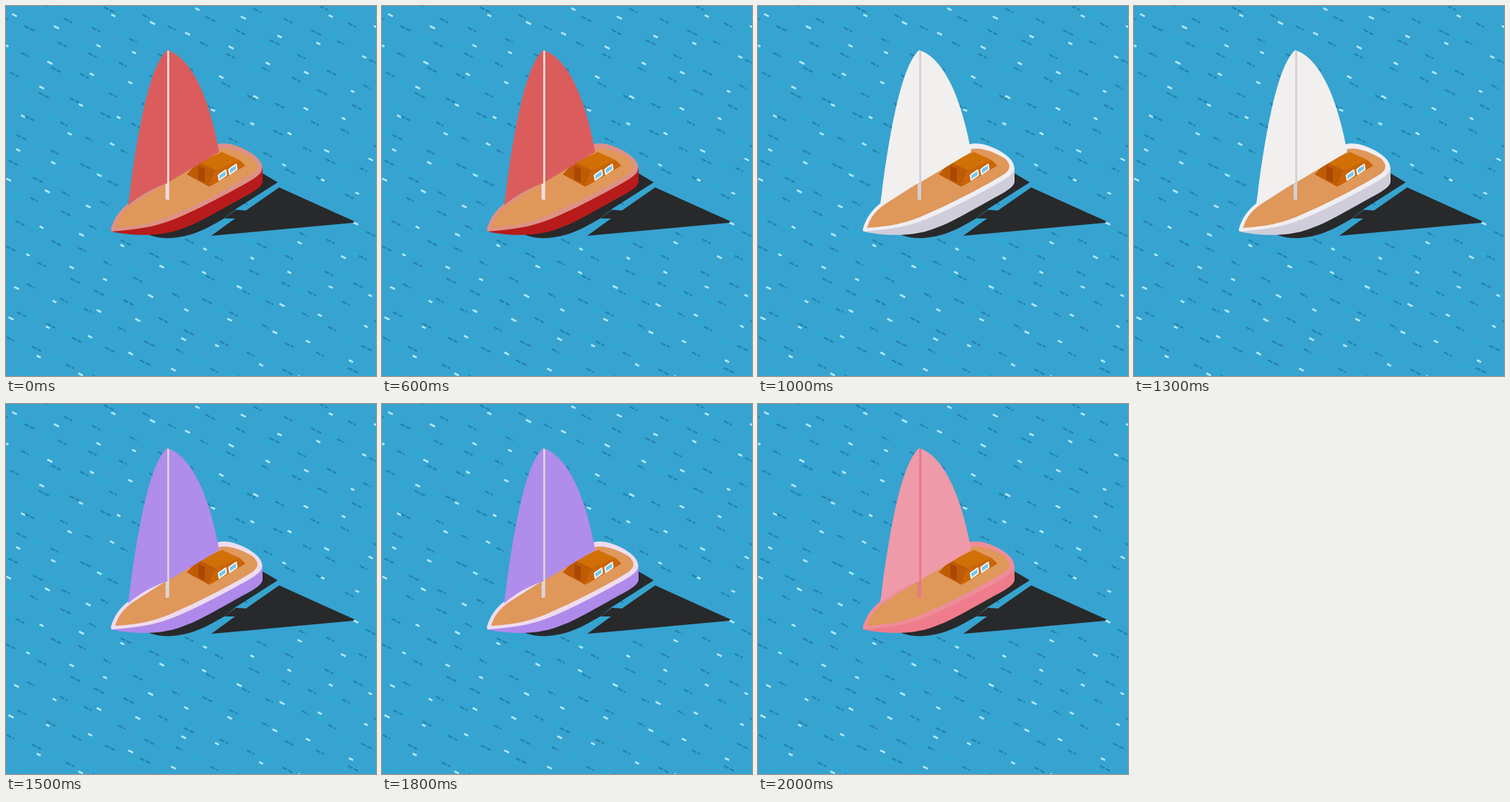
An HTML page for the animation above (2500 ms loop, 512 px wide and 512 px high).

```html
<!DOCTYPE html>
<html lang="en">
<head>
<meta charset="utf-8">
<title>Sailing boat</title>
<style>
  html, body { margin: 0; width: 100%; height: 100%; overflow: hidden; background: #37a3d0; }
  svg { display: block; width: 100%; height: 100%; }
  #waves path { fill: none; }
  #sail { fill: var(--sail); }
  #hull { fill: var(--hull); }
  #rim { fill: var(--rim); }
  .mast { stroke: var(--mast); fill: none; }
</style>
</head>
<body>
<svg id="scene" viewBox="0 0 512 512">
  <rect width="512" height="512" fill="#37a3d0"/>
  <g id="waves"></g>

  <g fill="#28292b">
    <path d="M354 231L376 244L318 281L302 294L284 304C255 320 225 326 198 317Z"/>
    <path d="M284 318L317 294L302 294L318 282L332 283L378 251L482 298L480 300Z"/>
  </g>

  <path id="hull" d="M145 308L146 312C170 318 210 319 235 311C262 303 282 290 310 275C330 263 355 253 355 243L355 223L240 285Z"/>
  <path id="rim" d="M145 309C149 294 158 281 171 272L291 192C305 187 325 194 340 204C352 212 356 220 354 227C352 235 338 242 320 252C298 264 270 279 240 292C205 307 180 309 146 312Z"/>
  <path id="deck" fill="#df975a" d="M151 307C155 293 163 283 176 274L295 198C310 195 328 203 340 210C350 217 351 226 340 233C320 246 270 272 240 285C205 302 180 305 151 307Z"/>

  <path fill="#d17005" d="M265 217L299 202L323 213L331 221L284 249L282 240Z"/>
  <path fill="#bf5b05" d="M250 233L266 216L290 227L281 250Z"/>
  <path fill="#c96508" d="M290 227L323 213L331 221L281 250Z"/>
  <path fill="#ab4706" d="M266 221L275 225L275 244L266 240Z"/>
  <g fill="#72c5e6" stroke="#f0f3f5" stroke-width="2" stroke-linejoin="round">
    <path id="window" d="M294 234L304 227L305 234L295 241Z"/>
    <use href="#window" x="14.5" y="-8"/>
  </g>

  <path id="sail" d="M223 61C196 85 180 190 169 276Q190 257 223 245Q258 224 295 202C282 130 258 72 223 61Z"/>
  <path class="mast" d="M224.5 62V247" stroke-width="2.8"/>
  <path class="mast" d="M223.3 246V268" stroke-width="5"/>
</svg>
<script>
const LOOP = 2500;
const PAINTS = [
  { until: 1000, sail: "#db5c5c", mast: "#f2dcdc", rim: "#dd9187", hull: "#b71b1b" },
  { until: 1500, sail: "#f1f0ef", mast: "#d2d0d2", rim: "#f0eef2", hull: "#d0cddb" },
  { until: 2000, sail: "#b08ceb", mast: "#ddd3d6", rim: "#efdcf0", hull: "#af8aea" },
  { until: LOOP, sail: "#ef9aa9", mast: "#e6798a", rim: "#ee8d98", hull: "#ef7c8c" }
];

let seed = 7;
const random = () => (seed = (seed * 16807) % 2147483647) / 2147483647;

// Short slanted strokes on a skewed grid with a little jitter.
function addDashes({ x, y, color, width, length, stepX, stepY, dash = "none" }) {
  let d = "";
  for (let row = -5; row < 18; row++) {
    for (let col = -3; col < 16; col++) {
      const px = x + col * stepX - row * 14 + (random() - 0.5) * 14;
      const py = y + row * stepY + col * 18 + (random() - 0.5) * 12;
      const size = length * (0.8 + random() * 0.4);
      d += `M${px.toFixed(1)} ${py.toFixed(1)}l${size.toFixed(1)} ${(size / 2).toFixed(1)}`;
    }
  }
  const path = document.createElementNS("http://www.w3.org/2000/svg", "path");
  path.setAttribute("d", d);
  path.setAttribute("stroke", color);
  path.setAttribute("stroke-width", width);
  path.setAttribute("stroke-dasharray", dash);
  document.getElementById("waves").append(path);
}

addDashes({ x: 8, y: 18, color: "#27b0d3", width: 1.9, length: 17, stepX: 42, stepY: 34 });
addDashes({ x: 28, y: 28, color: "#1f83b0", width: 2.3, length: 12, stepX: 42, stepY: 34, dash: "7 2" });
addDashes({ x: 13, y: 12, color: "#b0e9f7", width: 2.7, length: 6, stepX: 56, stepY: 42 });

const scene = document.getElementById("scene");
function draw(now) {
  const time = now % LOOP;
  const paint = PAINTS.find(({ until }) => time < until);
  for (const part of ["sail", "mast", "rim", "hull"]) {
    scene.style.setProperty("--" + part, paint[part]);
  }
}

const start = performance.now();
function tick() {
  draw(performance.now() - start);
  requestAnimationFrame(tick);
}
tick();
</script>
</body>
</html>
```
